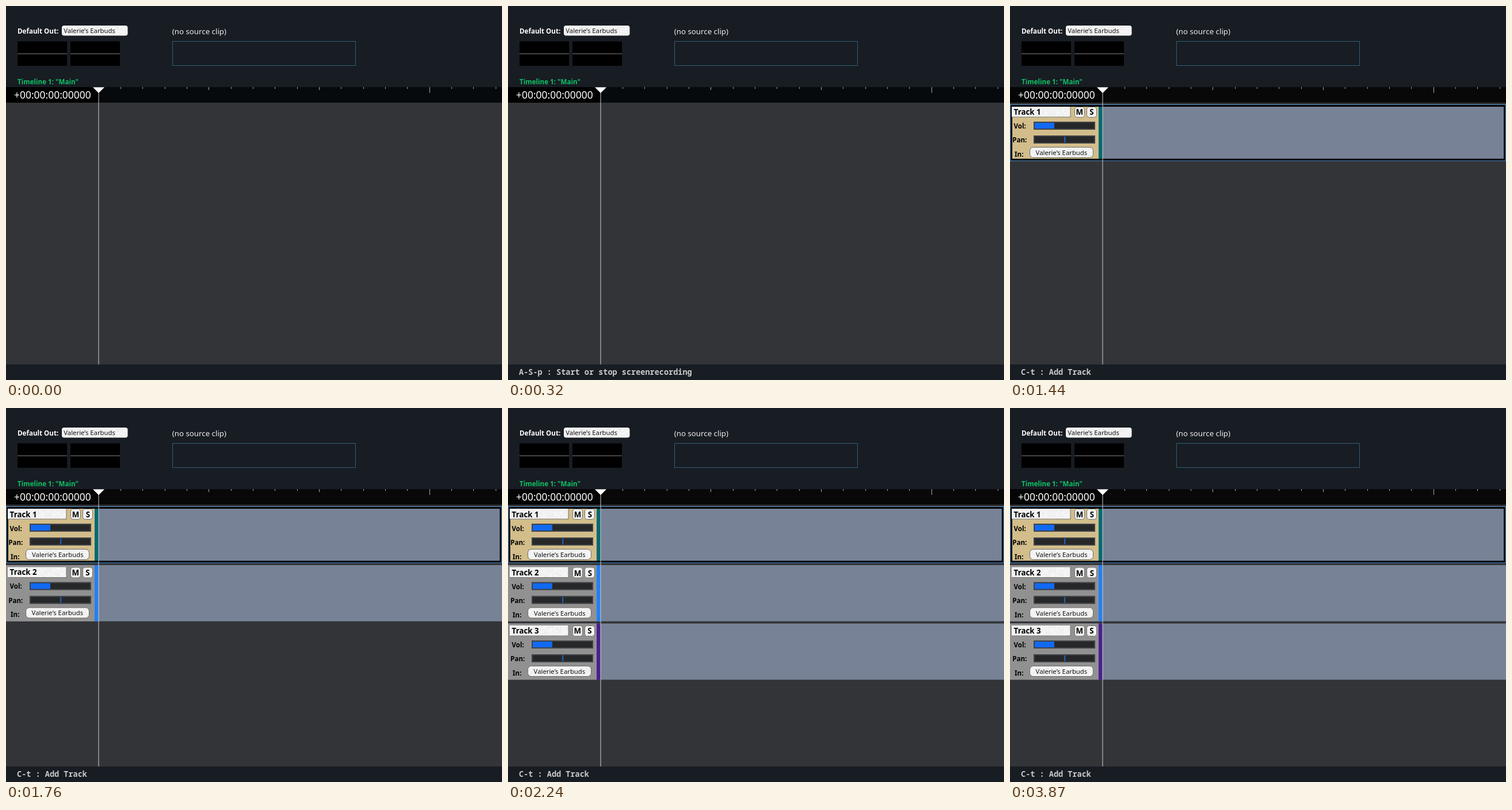
An HTML page with a canvas that plays this animation: 862x650 px, repeating every 4.96 s.

```html
<!DOCTYPE html>
<html lang="en">
<head>
<meta charset="utf-8">
<title>Timeline tracks</title>
<style>
html, body { margin: 0; width: 100%; height: 100%; overflow: hidden; background: #181c23; }
canvas { display: block; width: 862px; height: 650px; }
</style>
</head>
<body>
<canvas id="stage" width="862" height="650"></canvas>
<script>
const W = 862, H = 650, LOOP = 4960;
const HINT_AT = 320;
const TRACK_AT = [1440, 1760, 2240];
const BAR_COLORS = ["#056970", "#2380f1", "#49208f"];
const PITCH = 101.5;
const HEAD_X = 161;
const DEVICE = "Valerie’s Earbuds";
const SANS = '"Noto Sans", "Open Sans", sans-serif';
const MONO = '"Noto Sans Mono", "DejaVu Sans Mono", monospace';

const ctx = document.getElementById("stage").getContext("2d");
const paper = makePaper();

function makePaper() {
  const tile = document.createElement("canvas");
  tile.width = 128;
  tile.height = 32;
  const g = tile.getContext("2d");
  let seed = 7;
  for (let y = 0; y < 32; y++) {
    for (let x = 0; x < 128; x++) {
      seed = (seed * 16807) % 2147483647;
      const v = 233 + Math.floor(seed / 2147483647 * 20);
      g.fillStyle = `rgb(${v},${v},${v})`;
      g.fillRect(x, y, 1, 1);
    }
  }
  return ctx.createPattern(tile, "repeat");
}

function rect(x, y, w, h, color) {
  ctx.fillStyle = color;
  ctx.fillRect(x, y, w, h);
}

function frame(x, y, w, h, color, line = 1) {
  ctx.strokeStyle = color;
  ctx.lineWidth = line;
  ctx.strokeRect(x + line / 2, y + line / 2, w - line, h - line);
}

function text(str, x, y, size, color, weight = 400, align = "left", family = SANS) {
  ctx.font = `${weight} ${size}px ${family}`;
  ctx.textAlign = align;
  ctx.fillStyle = color;
  ctx.fillText(str, x, y);
}

function button(x, y, w, h, r, border) {
  ctx.beginPath();
  ctx.roundRect(x, y, w, h, r);
  ctx.fillStyle = paper;
  ctx.fill();
  if (!border) return;
  ctx.strokeStyle = border;
  ctx.lineWidth = 1;
  ctx.stroke();
}

function header() {
  text("Default Out:", 20, 48, 11.6, "#fff", 700);
  button(97, 34, 114.5, 17.5, 4);
  text(DEVICE, 100.3, 47.3, 11.3, "#111");
  for (const x of [20, 112]) {
    rect(x, 61.5, 86, 42.5, "#000");
    rect(x, 82.5, 86, 1, "#858585");
  }
  text("(no source clip)", 288.7, 49, 13.3, "#eee");
  frame(289, 61, 319, 43, "#2f5f78");
  text('Timeline 1: "Main"', 20, 136.3, 11.6, "#0cc365", 700);
}

function ruler(hasTracks) {
  rect(0, 141, W, 27, hasTracks ? "#080808" : "#060a0d");
  rect(0, 141, HEAD_X, 27, hasTracks ? "#050505" : "#000");
  for (let i = 1; i <= 18; i++) {
    const len = i % 15 === 0 ? 10 : i % 5 === 0 ? 5 : 3;
    rect(Math.round(HEAD_X - 0.2 + i * 38.32), 141, 1, len, "#aaa");
  }
  text("+00:00:00:00000", 14, 161.2, 17.45, "#fff");
}

function playhead() {
  rect(HEAD_X - 0.5, 150, 1, 473, "#d0d0d0");
  ctx.fillStyle = "#fff";
  ctx.beginPath();
  ctx.moveTo(HEAD_X - 10, 141.3);
  ctx.lineTo(HEAD_X + 10, 141.3);
  ctx.lineTo(HEAD_X, 151.3);
  ctx.fill();
}

function slider(y) {
  rect(41, y, 107, 14, "#404246");
  rect(43, y + 2, 103, 10, "#262728");
}

function track(i, settled) {
  const dy = i * PITCH;
  const selected = i === 0;
  const top = 171.5 + dy;

  rect(0, top, W, 97.7, "#778296");
  rect(0, top, 154, 97.7, selected ? "#d2bd8b" : "#919191");
  rect(154, top, 7, 97.7, BAR_COLORS[i]);
  if (selected) {
    frame(0, 171, W, 98.5, "#000", 4);
    frame(0, 171, W, 98.5, "#559bdb");
  }

  rect(3, 175 + dy, 102.5, 18.5, "#77746c");
  rect(3, 175 + dy, 101.5, 17.5, paper);
  button(112.5, 175.5 + dy, 17, 18, 4, "#77746c");
  button(133.5, 175.5 + dy, 17, 18, 4, "#77746c");
  slider(201 + dy);
  rect(43, 203 + dy, 34, 10, "#1169f2");
  slider(225 + dy);
  rect(94.5, 227 + dy, 1.6, 10, "#1674ea");
  button(34.5, 245.5 + dy, 110, 18, 6, "#6c6a64");

  // Labels sit slightly higher until the next track is laid out.
  const ty = dy + (settled ? 0.7 : 0);
  const tx = settled ? 0.4 : 0;
  text("Track " + (i + 1), 6.6, 188.8 + ty, 13.3, "#000", 700);
  text("M", 120.7 + tx, 189.3 + ty, 13.3, "#000", 700, "center");
  text("S", 142 + tx, 189.3 + ty, 13.3, "#000", 700, "center");
  text("Vol:", 6.5, 212.9 + ty, 11.6, "#000", 700);
  text("Pan:", 4.2, 237 + ty, 11.6, "#000", 700);
  text("In:", 8, 261.8 + ty, 11.6, "#000", 700);
  text(DEVICE, 89.4 + tx, 258.7 + ty, 11.3, "#111", 400, "center");
}

function draw(t) {
  const count = TRACK_AT.filter(at => t >= at).length;
  rect(0, 0, W, H, "#181c23");
  rect(0, 168, W, 455, "#333437");
  header();
  ruler(count > 0);
  for (let i = 0; i < count; i++) track(i, i < count - 1);
  playhead();
  if (t >= HINT_AT) {
    const hint = count ? "C-t : Add Track" : "A-S-p : Start or stop screenrecording";
    text(hint, 19, 640.6, 13.56, "#cacaca", 700, "left", MONO);
  }
}

const start = performance.now();
function tick() {
  draw((performance.now() - start) % LOOP);
  requestAnimationFrame(tick);
}
tick();
</script>
</body>
</html>
```
